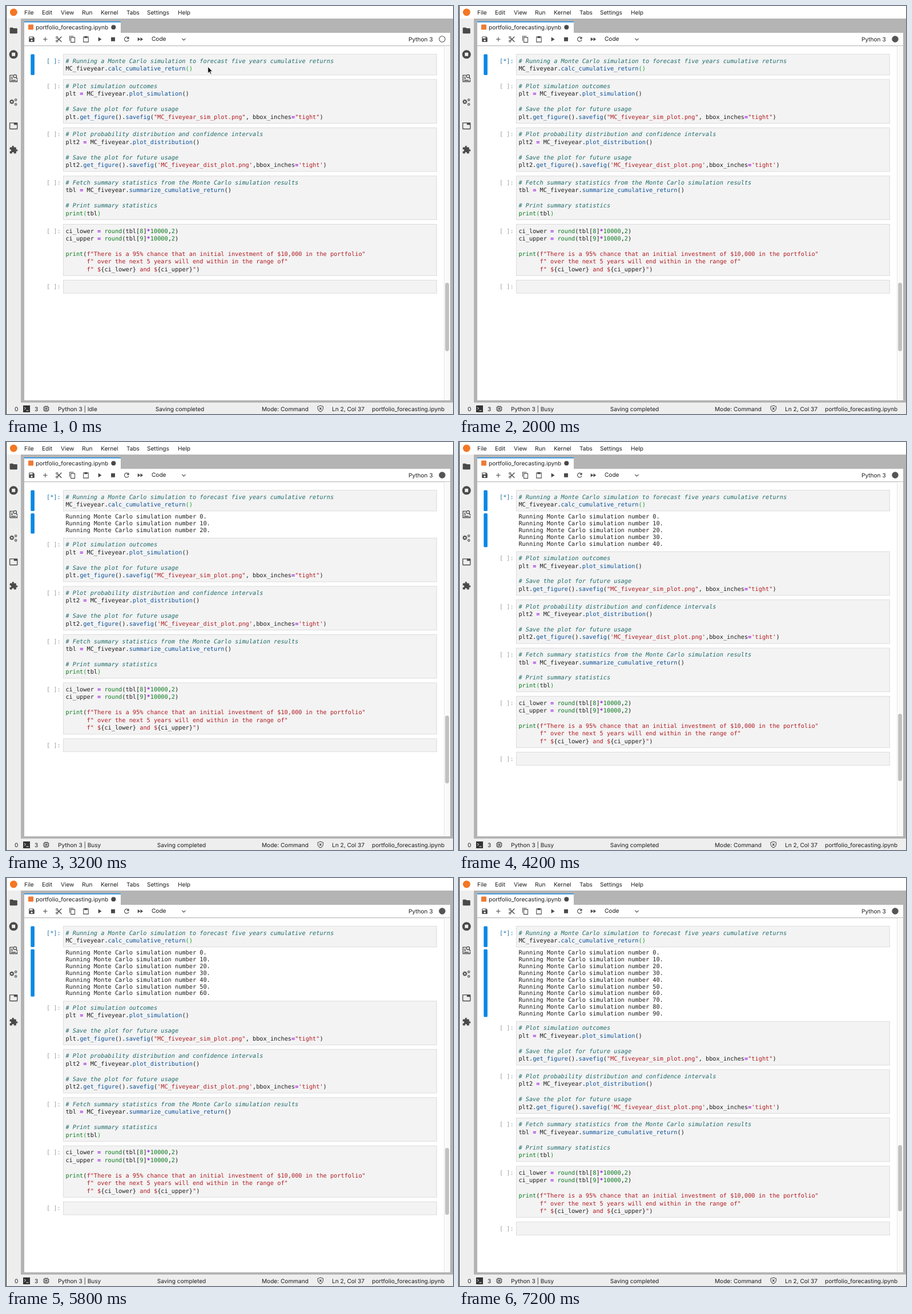
An HTML page that plays this animation: 783x715 px, repeating every 7.4 s.

```html
<!DOCTYPE html>
<html lang="en">
<head>
<meta charset="utf-8">
<title>Notebook run</title>
<style>
  html, body { margin: 0; width: 100%; height: 100%; overflow: hidden; background: #fff; }
  svg { display: block; width: 783px; height: 715px; }
  text { white-space: pre; text-rendering: geometricPrecision; fill: #1c1c1c; }
  .ui { font: 10.1px Inter, "Liberation Sans", sans-serif; }
  .code { font: 10.27px "DejaVu Sans Mono", monospace; }
  .comment { fill: #1f6b6b; font-style: italic; }
  .string { fill: #b01c22; }
  .prop { fill: #0b4f97; }
  .builtin { fill: #0a7a1e; }
  .number { fill: #0a7a1e; }
  .op { fill: #a21fe0; font-weight: bold; }
  .match { fill: #12a52a; }
  .plain { fill: #1c1c1c; }
  .prompt { fill: #9c9c9c; }
  .active { fill: #1b6fa3; }
  .icon { fill: #4a4a4a; }
  .line { fill: none; stroke: #4a4a4a; stroke-width: 2; }
</style>
</head>
<body>
<svg id="stage" viewBox="0 0 783 715"></svg>
<script>
const LOOP = 7400, BUSY_AT = 400;
const LINE_TIMES = [2200, 2600, 3200, 3800, 4200, 4800, 5400, 6000, 6600, 7200];
const S = 0.79;                       // page zoom
const LINE = 17 * S, OUT_LINE = 15 * S, PAD = 5 * S;
const LEFT = 104.4, TOP = 84.6;

// « and » stand for a highlighted pair of brackets
const CELLS = [
  `# Running a Monte Carlo simulation to forecast five years cumulative returns
MC_fiveyear.calc_cumulative_return«»`,
  `# Plot simulation outcomes
plt = MC_fiveyear.plot_simulation()

# Save the plot for future usage
plt.get_figure().savefig("MC_fiveyear_sim_plot.png", bbox_inches="tight")`,
  `# Plot probability distribution and confidence intervals
plt2 = MC_fiveyear.plot_distribution()

# Save the plot for future usage
plt2.get_figure().savefig('MC_fiveyear_dist_plot.png',bbox_inches='tight')`,
  `# Fetch summary statistics from the Monte Carlo simulation results
tbl = MC_fiveyear.summarize_cumulative_return()

# Print summary statistics
print«tbl»`,
  `ci_lower = round(tbl[8]*10000,2)
ci_upper = round(tbl[9]*10000,2)

print(f"There is a 95% chance that an initial investment of $10,000 in the portfolio"
      f" over the next 5 years will end within in the range of"
      f" \${ci_lower} and \${ci_upper}")`,
  ``
];

const rect = (x, y, w, h, fill, extra = '') =>
  `<rect x="${x}" y="${y}" width="${w}" height="${h}" fill="${fill}" ${extra}/>`;
const text = (x, y, body, cls = 'ui', extra = '') =>
  `<text x="${x}" y="${y}" class="${cls}" ${extra}>${body}</text>`;
const span = (cls, body) => `<tspan class="${cls}">${body}</tspan>`;
// 24-unit icon centred on x, y
const icon = (x, y, size, body) =>
  `<g transform="translate(${x} ${y}) scale(${size / 24}) translate(-12 -12)">${body}</g>`;
const solid = d => `<path class="icon" fill-rule="evenodd" d="${d}"/>`;
const stroke = (d, w = 2) => `<path class="line" style="stroke-width:${w}" d="${d}"/>`;
const disc = (x, y, r, cls = 'icon') => `<circle cx="${x}" cy="${y}" r="${r}" class="${cls}"/>`;

function paint(token) {
  const c = token[0];
  if (c === '#') return span('comment', token);
  if (/^f?["']/.test(token)) return span('string', token.replace(/\{.*?\}/g, m => span('plain', m)));
  if (c === '.') return '.' + span('prop', token.slice(1));
  if (token === 'print' || token === 'round') return span('builtin', token);
  if (/\d/.test(c)) return span('number', token);
  if (c === '=' || c === '*') return span('op', token);
  if (c === '«') return span('match', '(');
  if (c === '»') return span('match', ')');
  return token;
}
const highlight = line =>
  line.replace(/#.*|f?"[^"]*"|'[^']*'|\.\w+|[A-Za-z_]\w*|\d+|[=*«»]/g, paint);

const boxHeight = code => (code.split('\n').length * 17 + 12) * S;

function cell(code, y, first) {
  const base = y + 15.1;
  return rect(100.5, y, 653.8, boxHeight(code), '#f3f3f3', 'stroke="#d9d9d9" stroke-width=".9"') +
    text(71, base, '[ ]:', 'code ' + (first ? 'active' : 'prompt'), first ? 'id="prompt"' : '') +
    code.split('\n').map((l, i) => text(LEFT, base + i * LINE, highlight(l), 'code')).join('');
}

function notebook() {
  const outTop = TOP + boxHeight(CELLS[0]) + PAD;
  let y = TOP, rest = '';
  CELLS.forEach((code, i) => {
    if (i) rest += cell(code, y);
    y += boxHeight(code) + 10 * S;
  });
  const lines = LINE_TIMES.map((_, i) =>
    text(LEFT, outTop + 9.5 + i * OUT_LINE, `Running Monte Carlo simulation number ${i * 10}.`, 'code out'));
  return rect(43.3, TOP, 6.6, boxHeight(CELLS[0]), '#0a88e6', 'rx="1.5"') +
    rect(43.3, outTop, 6.6, 0, '#0a88e6', 'rx="1.5" id="bar"') +
    cell(CELLS[0], TOP, true) + lines.join('') + `<g id="rest">${rest}</g>`;
}

function frame() {
  return rect(0, 0, 783, 715, '#fff') +
    rect(0, 22, 783, 673, '#b4b4b4') + rect(0, 22, 26, 673, '#eee') +
    rect(32, 47, 746, 644, '#fff') + rect(32, 27, 169, 21, '#fff') + rect(32, 27, 169, 1.6, '#1b8ae0') +
    rect(32, 69, 746, 1, '#bdbdbd') + rect(32, 70, 746, 1, '#ececec') +
    rect(767, 70, 11, 621, '#fafafa') + rect(767, 70, 1, 621, '#e6e6e6') +
    rect(769.2, 485, 6.8, 120, '#c1c1c1', 'rx="3.4" id="thumb"') +
    rect(0, 695, 783, 20, '#eee') + rect(0, 0, 1, 715, '#3a3a3a');
}

function menus() {
  const items = { File: 32, Edit: 63, View: 96, Run: 133, Kernel: 166, Tabs: 211, Settings: 247, Help: 301 };
  return `<circle cx="13.3" cy="11" r="6.5" fill="#f37726"/>` +
    Object.entries(items).map(([name, x]) => text(x, 15.2, name)).join('') +
    rect(39, 32.5, 9, 9, '#ef7a35', 'rx="1"') +
    text(52, 40.7, 'portfolio_forecasting.ipynb') + disc(188.3, 37.3, 4);
}

function toolbar() {
  const icons = [
    solid('M17 3H5Q3 3 3 5V19Q3 21 5 21H19Q21 21 21 19V7zM5 5H15V9H5zM9 16a3 3 0 0 1 6 0a3 3 0 0 1-6 0z'),
    stroke('M12 5V19M5 12H19'),
    disc(6, 6, 3, 'line') + disc(6, 18, 3, 'line') + stroke('M8 8L21 20.5M8 16L21 3.5', 2.6),
    stroke('M3 17V2H16M7 6H20V22H7z'),
    stroke('M4 4H20V21H4z') + solid('M7 2H17V8H7z'),
    solid('M8 5V19L19 12z'),
    solid('M5.5 5.5H18.5V18.5H5.5z'),
    stroke('M18 7.5A7.2 7.2 0 1 0 19 14', 2.2) + solid('M20 3V11H12z'),
    solid('M4 18L12.5 12L4 6zM13 6V18L21.5 12z')
  ];
  return icons.map((body, i) => icon(45 + i * 23.75, 58.3, 12.8, body)).join('') +
    text(255, 61.3, 'Code') + `<path class="line" style="stroke-width:1.1" d="M308.3 56.8L311.4 60L314.5 56.8"/>` +
    text(705, 61.8, 'Python 3') +
    `<circle id="kernel" cx="764" cy="58" r="5.2" stroke="#555" stroke-width="1.1"/>`;
}

function gear(x, y, r) {
  const teeth = Array.from({ length: 8 }, (_, i) =>
    `<rect class="icon" x="${-r * .22}" y="${-r * 1.25}" width="${r * .44}" height="${r * .5}" transform="rotate(${i * 45})"/>`);
  return `<g transform="translate(${x} ${y})">${teeth.join('')}` +
    `<circle class="line" r="${r * .72}" style="stroke-width:${r * .5}"/></g>`;
}

function sidebar() {
  const hole = 'style="fill:#eee"';
  const icons = [
    solid('M10 4H4Q2 4 2 6V18Q2 20 4 20H20Q22 20 22 18V8Q22 6 20 6H12z'),
    solid('M12 .5a11.5 11.5 0 0 1 0 23a11.5 11.5 0 0 1 0-23zM8 7.5Q7.5 7.5 7.5 8V16Q7.5 16.5 8 16.5H16Q16.5 16.5 16.5 16V8Q16.5 7.5 16 7.5z'),
    stroke('M11 4H2.5V21H21.5V16M5.5 9H10M5.5 13H10M5.5 17.5H18', 2) +
      disc(16, 6.5, 4, 'line') + stroke('M18.5 9.5L22.5 14', 2.4),
    gear(7.5, 11, 5) + gear(18, 6, 3) + gear(18, 18, 3),
    solid('M21 3H3Q1 3 1 5V19Q1 21 3 21H21Q23 21 23 19V5Q23 3 21 3zM21 19H3V5H13V9H21z'),
    rect(2, 5, 17, 17, '#4a4a4a', 'rx="2"') + disc(10.5, 3.5, 2.5) + disc(20.5, 13.5, 2.5) +
      `<circle cx="3.2" cy="13.5" r="2.7" ${hole}/><circle cx="10.5" cy="20.8" r="2.7" ${hole}/>`
  ];
  return icons.map((body, i) => icon(13.2, 43 + i * 41.8, 15.8, body)).join('');
}

function status() {
  const y = 709.6;
  const pins = stroke('M9 1V5M15 1V5M9 19V23M15 19V23M1 9H5M1 15H5M19 9H23M19 15H23');
  return text(15, y, '0') + rect(30, 700, 12, 12, '#333') +
    `<path d="M32 703l2.5 2.2l-2.5 2.2M35.5 709h4" fill="none" stroke="#eee"/>` +
    text(50, y, '3') +
    icon(70.4, 705.8, 12, stroke('M5 5H19V19H5zM10 10H14V14H10z', 2.4) + pins) +
    text(91, y, '', 'ui', 'id="state"') + text(262, y, 'Saving completed', 'ui', 'id="saved"') +
    text(448, y, 'Mode: Command') +
    icon(550.8, 705.5, 12.5, stroke('M12 2L21 5V12Q20 19 12 22.5Q4 19 3 12V5zM8.5 8.5L15.5 15.5M15.5 8.5L8.5 15.5')) +
    text(571, y, 'Ln 2, Col 37') + text(641, y, 'portfolio_forecasting.ipynb');
}

const pointer = `<path id="pointer" d="M353.6 106.3v11.6l2.7-2.5 1.8 4 1.8-.8-1.8-3.9h3.7z"
  fill="#111" stroke="#fff" stroke-width=".8"/>`;

const $ = id => document.getElementById(id);
$('stage').innerHTML = frame() + menus() + toolbar() + sidebar() + notebook() + status() + pointer;
const outputs = document.querySelectorAll('.out');

let shown = '';
function draw(t) {
  const busy = t >= BUSY_AT;
  const count = LINE_TIMES.filter(at => at <= t).length;
  const key = busy + ':' + count;
  if (key === shown) return;
  shown = key;

  const shift = count ? PAD + count * OUT_LINE : 0;
  $('prompt').textContent = busy ? '[*]:' : '[ ]:';
  $('kernel').setAttribute('fill', busy ? '#555' : '#fff');
  $('state').textContent = 'Python 3 | ' + (busy ? 'Busy' : 'Idle');
  $('saved').setAttribute('x', busy ? 264.7 : 261.7);
  $('pointer').setAttribute('visibility', busy ? 'hidden' : 'visible');
  outputs.forEach((line, i) => line.setAttribute('visibility', i < count ? 'visible' : 'hidden'));
  $('bar').setAttribute('height', count * OUT_LINE);
  $('rest').setAttribute('transform', `translate(0 ${shift})`);
  $('thumb').setAttribute('y', 485 - shift * 0.139);
  $('thumb').setAttribute('height', 120 - shift * 0.032);
}

const start = performance.now();
function tick() {
  draw((performance.now() - start) % LOOP);
  requestAnimationFrame(tick);
}
tick();
</script>
</body>
</html>
```
